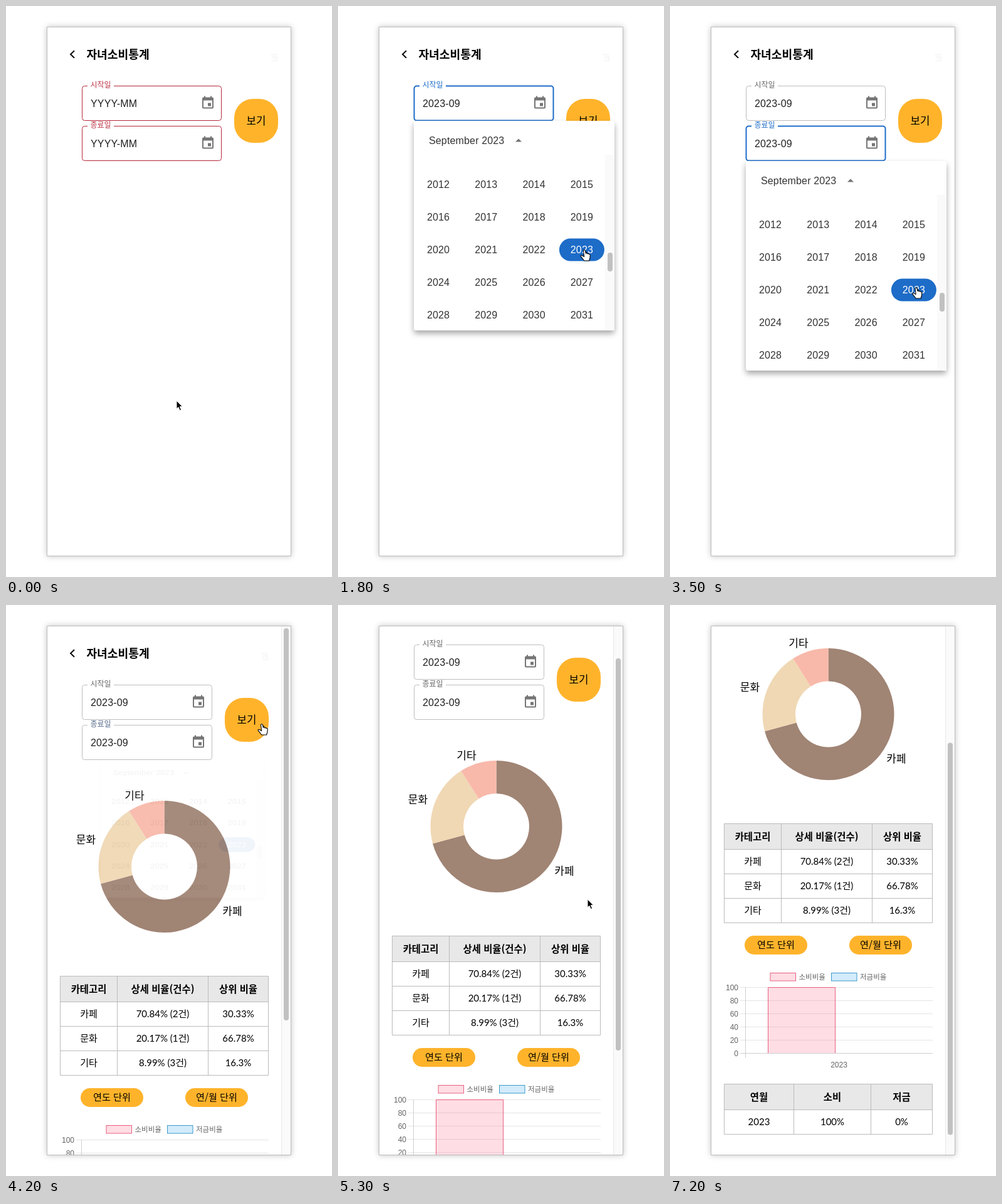
Recreate the animation shown at these times as an HTML page. Size 520 px wide and 910 px high, loop 8 s.

```html
<!DOCTYPE html>
<html lang="ko">
<head>
<meta charset="utf-8">
<title>자녀소비통계</title>
<style>
  html, body { margin: 0; width: 100%; height: 100%; overflow: hidden; background: #fff; }
  svg { display: block; }
  text { font-family: "Noto Sans CJK KR", "Noto Sans CJK", sans-serif; }
  .ui { font-family: "Liberation Sans", Arial, sans-serif; letter-spacing: .15px; }
  .axis { font-family: "Liberation Sans", Arial, sans-serif; }
  .cell { font-family: Lato, "Noto Sans CJK KR", "Noto Sans CJK", sans-serif; }
  .device { box-shadow: 0 0 10px rgba(0, 0, 0, .2); }
</style>
</head>
<body>
<svg id="stage" width="520" height="910" viewBox="0 0 520 910">
  <defs>
    <clipPath id="screen"><rect x="66" y="34" width="388" height="842"/></clipPath>
    <filter id="glow" x="-20%" y="-20%" width="140%" height="140%">
      <feDropShadow dx="0" dy="0" stdDeviation="5" flood-opacity=".24"/>
    </filter>
    <filter id="lift" x="-20%" y="-20%" width="140%" height="140%">
      <feDropShadow dx="0" dy="5" stdDeviation="5" flood-opacity=".34"/>
    </filter>
  </defs>
  <rect x="65.5" y="33.5" width="389" height="843" fill="#fff" stroke="#bdbdbd" filter="url(#glow)"/>
  <g clip-path="url(#screen)">
    <g id="page"></g>
    <g id="bar">
      <rect x="439" y="34" width="15" height="842" fill="#fafafa"/>
      <path d="M439.5 34V876" stroke="#e8e8e8"/>
      <rect id="thumb" x="443" y="37" width="8" height="625" rx="4" fill="#c1c1c1"/>
    </g>
  </g>
  <g id="picker"></g>
  <g id="cursor">
    <path id="arrow" fill="#000" stroke="#fff" stroke-width="1" d="M0 0V13.2L3 10.4L5.3 15.6L7.6 14.6L5.4 9.6H9.4Z"/>
    <path id="hand" fill="#fff" stroke="#000" stroke-width="1.1" stroke-linejoin="round"
      d="M-1.5 1C-1.5-.6 1-.6 1.4 1L2.4 5.4C3-.1+4 5.2 4.6 6C5.2 5 7 5.4 7 6.6C7.8 6 9 6.4 9.2 7.6L9 12L7.6 17H-.2L-5.6 10.2C-6.6 8.6-4.6 7.6-3.4 8.8L-.4 10.6Z"/>
  </g>
</svg>
<script>
const LOOP = 8000, STEP = 100;
const AMBER = '#ffb32b', RED = '#b5283a', BLUE = '#1d6cc8', LINE = '#bbb';
const SVG = 'http://www.w3.org/2000/svg';
const $ = id => document.getElementById(id);
const page = $('page');

function add(parent, tag, attrs = {}, content) {
  const el = document.createElementNS(SVG, tag);
  set(el, attrs);
  if (content !== undefined) el.textContent = content;
  return parent.appendChild(el);
}
function set(el, attrs) {
  for (const k in attrs) el.setAttribute(k, attrs[k]);
}
function show(el, on) { el.style.display = on ? '' : 'none'; }
const rect = (p, x, y, width, height, attrs) => add(p, 'rect', { x, y, width, height, ...attrs });
const path = (p, d, attrs) => add(p, 'path', { d, fill: 'none', ...attrs });

// y is the vertical middle of the text
function label(p, x, y, str, size, attrs) {
  return add(p, 'text', { x, y: y + size * .36, 'font-size': size, ...attrs }, str);
}
const mid = { 'text-anchor': 'middle' };

// header
path(page, 'M109 71.2L103 77L109 82.8', { stroke: '#000', 'stroke-width': 1.9 });
label(page, 128.4, 77, '자녀소비통계', 18.2, { 'font-weight': 700, textLength: '' }).removeAttribute('textLength');
const faint = path(page, 'M422 77H432M425 80H432V87M424 83H432M423 87H433', { stroke: '#f0f0f0' });

// date fields
function makeField(y, name) {
  const g = add(page, 'g');
  const frame = rect(g, 121.5, y + .5, 222, 55, { rx: 4, fill: '#fff' });
  const notch = rect(g, 130, y - 1, 42, 4, { fill: '#fff' });
  const caption = label(g, 134.5, y - 1.5, name, 12);
  const value = label(g, 135, y + 28, '', 16, { class: 'ui', fill: '#212121' });
  const icon = add(g, 'g');
  const halo = add(icon, 'circle', { cx: 322, cy: y + 28, r: 20, fill: '#000', 'fill-opacity': .045 });
  path(icon, 'M17 12h-5v5h5v-5zM16 1v2H8V1H6v2H5c-1.11 0-1.99.9-1.99 2L3 19c0 1.1.89 2 2 2h14c1.1 0 2-.9 2-2V5c0-1.1-.9-2-2-2h-1V1h-2zm3 18H5V8h14v11z',
    { fill: '#757575', transform: `translate(310 ${y + 15.5})` });
  return { frame, caption, value, icon, halo };
}
const fields = [makeField(127, '시작일'), makeField(191, '종료일')];

function drawField(f, state) {
  const { filled, focus, hover, tint, shift } = state;
  const color = filled ? (focus ? BLUE : '#bdbdbd') : RED;
  set(f.frame, { stroke: color, 'stroke-width': focus ? 2 : 1, width: 222 - shift });
  f.caption.setAttribute('fill', !filled ? '#bd3547' : focus ? BLUE : tint ? '#566a8a' : '#666');
  f.value.textContent = filled ? '2023-09' : 'YYYY-MM';
  f.icon.setAttribute('transform', `translate(${-shift} 0)`);
  show(f.halo, hover);
}

const view = add(page, 'g');
rect(view, 364, 148, 70, 70, { rx: 30, fill: AMBER });
label(view, 399, 183, '보기', 16.8, { ...mid, 'font-weight': 500 });

// results
const results = add(page, 'g');

function donut(cx, cy, R, r, parts) {
  const pt = (rad, a) => `${cx + rad * Math.sin(a)} ${cy - rad * Math.cos(a)}`;
  let a = 0;
  for (const [share, fill] of parts) {
    const b = a + share / 100 * 2 * Math.PI, big = share > 50 ? 1 : 0;
    path(results, `M${pt(R, a)}A${R} ${R} 0 ${big} 1 ${pt(R, b)}L${pt(r, b)}A${r} ${r} 0 ${big} 0 ${pt(r, a)}Z`, { fill });
    a = b;
  }
}
donut(252.5, 417, 105, 52.5, [[70.84, '#a08474'], [20.17, '#f0d8b4'], [8.99, '#f8b9aa']]);
[[205, 303.5, '기타'], [127.5, 374, '문화'], [361, 487.5, '카페']]
  .forEach(([x, y, s]) => label(results, x, y, s, 17, mid));

function table(top, xs, rows) {
  const left = xs[0], right = xs[xs.length - 1], bottom = top + 41 + 39 * (rows.length - 1);
  rect(results, left, top, right - left, 41, { fill: '#e8e8e8' });
  let d = `M${left} ${top}H${right}`;
  rows.forEach((row, i) => {
    d += `M${left} ${top + 41 + 39 * i}H${right}`;
    row.forEach((s, j) => {
      const x = (xs[j] + xs[j + 1]) / 2;
      if (i) label(results, x, top + 21.5 + 39 * i, s, 15, { ...mid, class: 'cell' });
      else label(results, x, top + 20.5, s, 15.4, { ...mid, 'font-weight': 700 });
    });
  });
  xs.forEach(x => d += `M${x} ${top}V${bottom}`);
  path(results, d, { stroke: LINE });
}
table(591.5, [86.5, 177.5, 322.5, 418.5], [
  ['카테고리', '상세 비율(건수)', '상위 비율'],
  ['카페', '70.84% (2건)', '30.33%'],
  ['문화', '20.17% (1건)', '66.78%'],
  ['기타', '8.99% (3건)', '16.3%']
]);
table(1006.5, [86.5, 197.5, 320.5, 418.5], [['연월', '소비', '저금'], ['2023', '100%', '0%']]);

[[119, '연도 단위'], [286, '연/월 단위']].forEach(([x, s]) => {
  rect(results, x, 770, 100, 30, { rx: 15, fill: AMBER });
  label(results, x + 50, 785, s, 15.2, mid);
});

// bar chart
const PINK = { fill: '#ff6384', 'fill-opacity': .22, stroke: '#e8607f' };
const SKY = { fill: '#36a2eb', 'fill-opacity': .22, stroke: '#3a9acb' };
[[160, '소비비율', PINK], [257.5, '저금비율', SKY]].forEach(([x, s, style]) => {
  rect(results, x, 829.5, 40.5, 12.5, style);
  label(results, x + 45.5, 835.5, s, 11.5, { fill: '#666' });
});
for (let i = 0; i <= 5; i++) {
  const y = 852.5 + 21 * i;
  path(results, `M112 ${y}H419`, { stroke: i < 5 ? '#e5e5e5' : '#cfcfcf' });
  label(results, 109, y, 100 - 20 * i, 12, { class: 'axis', fill: '#666', 'text-anchor': 'end' });
}
path(results, 'M120.5 852V965', { stroke: '#cfcfcf' });
label(results, 269.5, 976, '2023', 12, { ...mid, class: 'axis', fill: '#666' });
const column = path(results, '', PINK);

// month and year picker
const picker = $('picker');
const card = rect(picker, 0, 0, 320, 262, { rx: 4, fill: '#fff', filter: 'url(#lift)' });
label(picker, 24, 31, 'September 2023', 16, { class: 'ui', fill: '#333' });
const caret = path(picker, 'M-5-2.5H5L0 2.5Z', { fill: '#757575' });

function grid(names, cols, x0, dx, y0, chosen) {
  const g = add(picker, 'g');
  names.forEach((s, i) => {
    const x = x0 + dx * (i % cols), y = y0 + 52 * Math.floor(i / cols), on = s === chosen;
    if (on) rect(g, x - 36, y - 18, 72, 36, { rx: 18, fill: BLUE });
    label(g, x, y, s, 16, { ...mid, class: 'ui', fill: on ? '#fff' : '#333' });
  });
  return g;
}
const months = grid('Jan Feb Mar Apr May Jun Jul Aug Sep Oct Nov Dec'.split(' '), 3, 57.3, 106.6, 80, 'Sep');
const years = grid(Array.from({ length: 20 }, (_, i) => String(2012 + i)), 4, 39, 76.3, 101.5, '2023');
rect(years, 305, 54, 15, 280, { fill: '#fafafa' });
rect(years, 309, 210, 8, 30, { rx: 4, fill: '#c1c1c1' });

// keyed motion: [time, ...values]
const CURSOR = [[0, 272, 629], [700, 321, 166], [900, 322, 162], [1000, 324, 201], [1300, 391, 367],
  [1500, 392, 370], [1800, 393, 389], [2000, 393, 389], [2500, 307, 214], [2600, 304, 213],
  [2800, 319, 219], [2900, 322, 226], [3200, 391, 432], [3400, 392, 446], [3600, 393, 452],
  [4000, 405, 191], [4200, 408, 190], [4400, 408, 192], [4800, 398, 469], [5400, 398, 469],
  [5700, 399, 470], [6800, 399, 470], [7100, 248, 767]];
const POPUP = [[800, .75, 0], [900, .88, .35], [1000, .995, .82], [1100, 1, 1], [1900, 1, 1],
  [2200, .75, 0], [2700, .75, 0], [2800, .88, .35], [2900, .99, .82], [3000, 1, 1],
  [3600, 1, 1], [3800, .81, .06], [4300, .81, .06], [4500, .81, 0]];
const SCROLL = [[5100, 0], [5200, 22], [5300, 64], [5400, 130], [5500, 197], [5600, 252], [5700, 281],
  [5900, 281], [6100, 272], [6400, 252], [6700, 243]];
const HAND = [[700, 900], [1200, 2100], [2500, 2800], [3100, 3700], [3900, 4400]];

function at(keys, t) {
  const n = keys.findIndex(k => k[0] > t);
  if (n === 0) return keys[0].slice(1);
  if (n < 0) return keys[keys.length - 1].slice(1);
  const a = keys[n - 1], b = keys[n], u = (t - a[0]) / (b[0] - a[0]);
  return a.slice(1).map((v, i) => v + (b[i + 1] - v) * u);
}
const within = (t, a, b) => t >= a && t <= b;

function draw(t) {
  const done = t >= 4100, shift = done ? 15 : 0;
  const [scroll] = at(SCROLL, t);
  page.setAttribute('transform', `translate(0 ${-scroll})`);
  $('thumb').setAttribute('y', 37 + scroll * .751);
  show(results, done);
  show($('bar'), done);
  view.setAttribute('transform', `translate(${-shift} 0)`);
  faint.setAttribute('transform', `translate(${-shift} 0)`);

  drawField(fields[0], { filled: t >= 1400, focus: within(t, 800, 2100), hover: within(t, 700, 1300), tint: t < 2800, shift });
  drawField(fields[1], { filled: t >= 3300, focus: within(t, 2800, 3700), hover: within(t, 2500, 3100), tint: t < 4600, shift });

  const grow = Math.min(Math.max((t - 4100) / 1000, 0), 1);
  const h = 105 * (1 - (1 - grow) ** 4);
  column.setAttribute('d', `M156.5 957V${957.5 - h}H263.5V957`);

  const [scale, alpha] = at(POPUP, t);
  const yearView = within(t, 1400, 2400) || t >= 3300;
  set(picker, {
    opacity: alpha,
    transform: `translate(281 ${t < 2500 ? 183 : 247}) scale(${scale} ${scale * scale}) translate(-160 0)`
  });
  show(picker, alpha > 0);
  card.setAttribute('height', yearView ? 334 : 262);
  caret.setAttribute('transform', `translate(167 31) rotate(${yearView ? 180 : 0})`);
  show(months, !yearView);
  show(years, yearView);

  const [x, y] = at(CURSOR, t);
  const pointing = HAND.some(([a, b]) => within(t, a, b));
  $('cursor').setAttribute('transform', `translate(${x} ${y})`);
  show($('cursor'), t < 7200);
  show($('arrow'), !pointing);
  show($('hand'), pointing);
}

const start = performance.now();
function tick() {
  const t = (performance.now() - start) % LOOP;
  draw(Math.floor(t / STEP) * STEP);
  requestAnimationFrame(tick);
}
tick();
</script>
</body>
</html>
```
